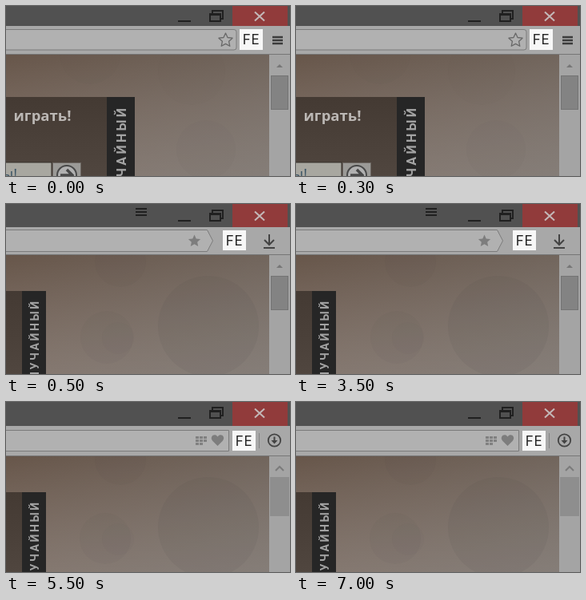
An HTML page for the animation above (8000 ms loop, 355 px wide and 213 px high).

```html
<!DOCTYPE html>
<html lang="ru">
<head>
<meta charset="utf-8">
<style>
  html, body { margin: 0; width: 100%; height: 100%; overflow: hidden; background: #515151; }
  svg { display: block; width: 100vw; height: 100vh; }
  .scene { display: none; }
  .scene.on { display: inline; }
  .line { fill: none; stroke: #202020; stroke-width: 2; }
  .fe { font: 17px Inter, sans-serif; letter-spacing: .5px; fill: #222; text-anchor: middle; }
  .tab { font-family: Roboto, sans-serif; font-weight: 700; fill: #a3a3a3; text-anchor: end; }
  .label { font: 700 18.5px "Open Sans", sans-serif; fill: #bbb7b4; }
</style>
</head>
<body>
<svg id="stage" viewBox="0 0 355 213" preserveAspectRatio="none">
  <defs>
    <linearGradient id="warm" x2="0" y2="1">
      <stop stop-color="#67564a"/><stop offset="1" stop-color="#847267"/>
    </linearGradient>
    <linearGradient id="cool" x2="1" y2="1">
      <stop stop-color="#85827f" stop-opacity="0"/><stop offset="1" stop-color="#85827f" stop-opacity=".7"/>
    </linearGradient>
    <linearGradient id="panel" x2="0" y2="1">
      <stop stop-color="#443a33"/><stop offset="1" stop-color="#50463f"/>
    </linearGradient>
  </defs>
</svg>
<script>
const stage = document.getElementById('stage');

const rect = (x, y, w, h, fill, extra = '') =>
  `<rect x="${x}" y="${y}" width="${w}" height="${h}" fill="${fill}" ${extra}/>`;
const path = (d, extra = '') => `<path class="line" d="${d}" ${extra}/>`;
const shape = (d, fill, extra = '') => `<path d="${d}" fill="${fill}" ${extra}/>`;
const circle = (x, y, r, fill, extra = '') =>
  `<circle cx="${x}" cy="${y}" r="${r}" fill="${fill}" ${extra}/>`;

function star(cx, cy, r) {
  const points = Array.from({ length: 10 }, (_, i) => {
    const a = i * Math.PI / 5 - Math.PI / 2, d = i % 2 ? r * 0.48 : r;
    return `${cx + d * Math.cos(a)},${cy + d * Math.sin(a)}`;
  });
  return `M${points.join('L')}Z`;
}

function titleBar(bottom, dy) {
  return rect(0, 0, 355, bottom, '#515151') +
    rect(283, 0, 69, bottom, '#913b3b') +
    path(`M215 ${19 + dy}h16`) +
    path(`M255 ${10 + dy}h13v9h-13zM255 ${11 + dy}h13M258 ${9 + dy}v-3h13v10h-3`) +
    path(`M311 ${7.5 + dy}l12 11m0-11l-12 11`, 'style="stroke:#c4b8b8"');
}

const toolbar = (top, bottom) =>
  rect(0, top, 355, bottom - top, '#a8a8a8') + rect(0, bottom - 1, 355, 1, '#767676');

const field = d => shape(d, '#b1b1b1', 'stroke="#7b7b7b"');

const badge = (x, y, w, h) => rect(x, y, w, h, '#f7f7f7') +
  `<text class="fe" x="${x + w / 2}" y="${y + h / 2 + 6}">FE</text>`;

const menu = (x, y, w, style = '') =>
  path([0, 4, 8].map(dy => `M${x} ${y + dy}h${w}`).join(''), `style="${style}"`);

const page = (top, rings) =>
  rect(0, top, 329, 213 - top, 'url(#warm)') + rect(0, top, 329, 213 - top, 'url(#cool)') +
  rings.map(([x, y, r, o]) => circle(x, y, r, '#3f3b3a', `fill-opacity="${o}"`)).join('');

function sideTab(x, y, w, textX, textTop, size, spacing) {
  return rect(0, y, x, 213 - y, 'url(#panel)') + rect(x, y, w, 213 - y, '#262626') +
    `<text class="tab" font-size="${size}" letter-spacing="${spacing}"
      transform="translate(${textX} ${textTop - spacing}) rotate(-90)">СЛУЧАЙНЫЙ</text>`;
}

const scrollBar = (top, thumbX, thumbW, thumbY, thumbH, fill) =>
  rect(329, top, 26, 213 - top, '#a4a4a4') +
  rect(thumbX, thumbY, thumbW, thumbH, fill);

const arrowUp = y => shape(`M338 ${y + 2}l4-4 4 4z`, '#777');
const thumbEdge = y => rect(331.5, y + .5, 21, 42, 'none', 'stroke="#747474"');

const scenes = [
  { end: 500, draw: () =>
    page(61, [[250, 180, 37, .03], [232, 82, 42, .02], [105, 60, 38, .03]]) +
    sideTab(126, 114, 35, 150, 128, 16, 3.3) +
    `<text class="label" x="9.5" y="144">играть!</text>` +
    rect(-2, 196, 59, 20, '#a8a7a0', 'stroke="#37312d"') +
    `<text class="label" x="-5" y="217" style="fill:#3c5566;font-weight:400">ы!</text>` +
    rect(58.5, 196.5, 35, 20, '#9b9a97', 'stroke="#6c6661"') +
    circle(76, 212, 12, '#b0b0b0', 'stroke="#484848" stroke-width="2"') +
    path('M68 212h14m-6-7l7 7-7 7', 'style="stroke:#484848;stroke-width:3.5"') +
    scrollBar(61, 331, 22, 87, 43, '#838383') + thumbEdge(87) + arrowUp(75) +
    titleBar(25, 0) + toolbar(25, 61) +
    field('M-2 29.5H285q3 0 3 3V52q0 3-3 3H-2z') +
    shape(star(274.5, 43, 9), 'none', 'stroke="#686868" stroke-width="1.3" stroke-linejoin="round"') +
    badge(292, 29, 29, 26) + menu(333, 39, 13, 'stroke:#3c3c3c;stroke-width:2.6') },

  { end: 5500, draw: () =>
    page(64, [[253, 153, 63, .07], [126, 167, 33, .04], [143, 72, 32, .04], [140, 168, 20, .03]]) +
    sideTab(20, 109, 30, 41, 122, 14, 2.6) +
    scrollBar(64, 331, 22, 90, 43, '#838383') + thumbEdge(90) + arrowUp(78) +
    titleBar(29, 2) + menu(162, 6, 14) + toolbar(29, 64) +
    field('M-2 32.5H251.5L258.5 46L251.5 59.5H-2z') +
    shape(star(235.5, 46.5, 8), '#7d7d7d') +
    badge(271, 33, 29, 25) +
    path('M329 38v13m-6-6l6 6 6-6M322 55h14', 'style="stroke:#434343"') },

  { end: 8000, draw: () =>
    page(68, [[253, 157, 63, .07], [124, 171, 32, .04], [143, 72, 32, .04], [140, 172, 20, .03]]) +
    sideTab(20, 113, 30, 41, 126, 14, 2.6) +
    scrollBar(68, 330, 24, 94, 49, '#8e8e8e') +
    path('M337 86l5-5 5 5', 'style="stroke:#7b7b7b"') +
    titleBar(30, 1) + toolbar(30, 68) +
    field('M-2 35.5H278.5V61.5H-2z') +
    [0, 1, 2].map(row => [0, 1, 2].map(col => row + col === 4 ? '' :
      rect(237 + col * 5, 43 + row * 4, 4, 3, '#808080')).join('')).join('') +
    shape('M264.5 55L258 48.5C254 43 261 38.5 264.5 43.5C268 38.5 275 43 271 48.5Z', '#7d7d7d') +
    badge(283, 36, 29, 25) + rect(316, 39, 1, 19, '#858585') +
    circle(335.5, 48, 7.7, 'none', 'stroke="#434343" stroke-width="1.8"') +
    path('M335.5 43.5v6', 'style="stroke:#434343"') +
    shape('M331.5 48h8l-4 4.5z', '#434343') }
];

stage.insertAdjacentHTML('beforeend',
  scenes.map(s => `<g class="scene">${s.draw()}</g>`).join(''));
const groups = stage.querySelectorAll('.scene');
const start = performance.now();

function tick() {
  const time = (performance.now() - start) % 8000;
  const current = scenes.findIndex(s => time < s.end);
  groups.forEach((g, i) => g.classList.toggle('on', i === current));
  requestAnimationFrame(tick);
}
tick();
</script>
</body>
</html>
```
